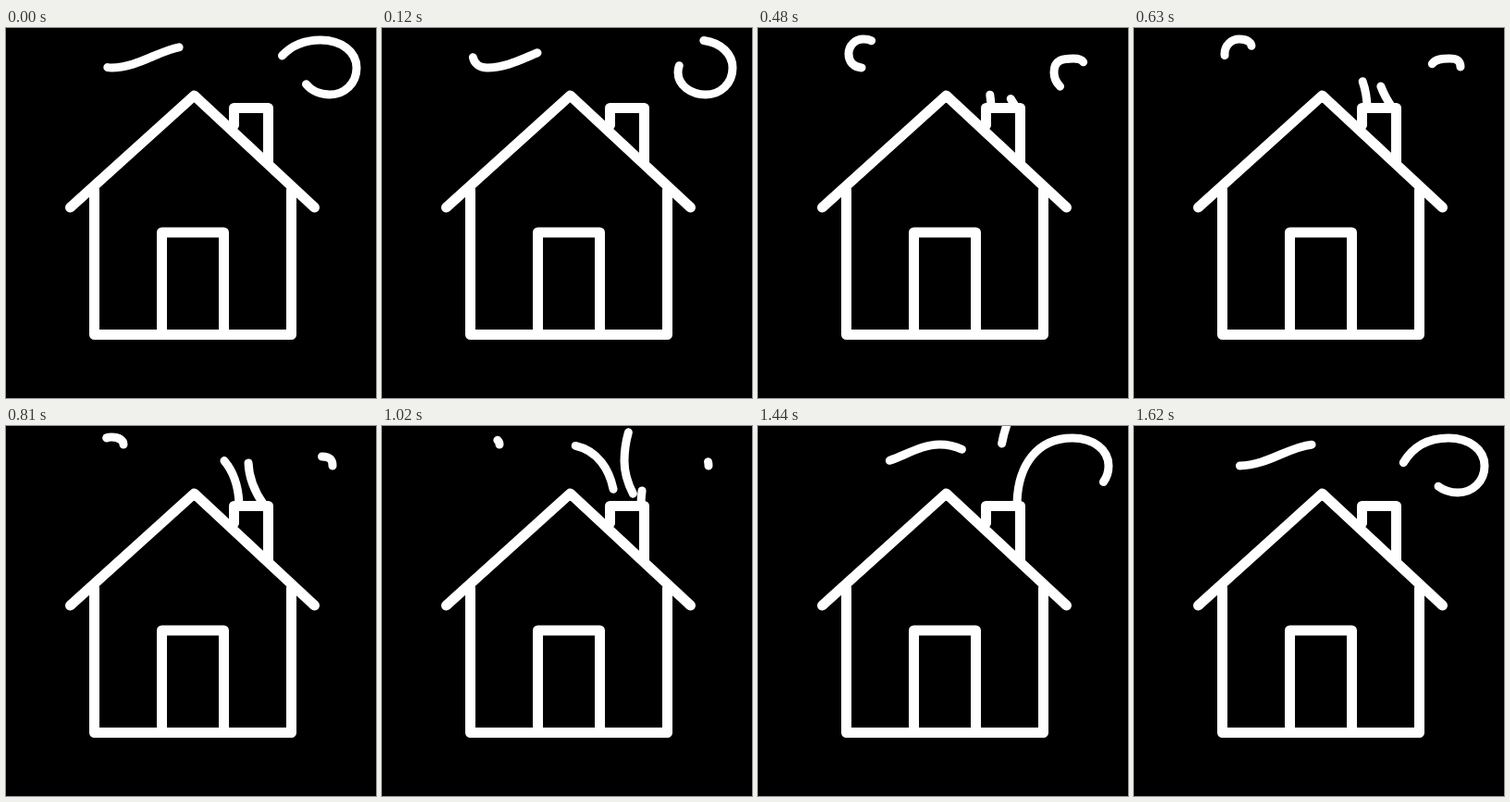
Recreate the animation shown at these times as an HTML page. Size 400 px wide and 400 px high, loop 1.65 s.

```html
<!DOCTYPE html>
<html lang="en">
<head>
<meta charset="utf-8">
<title>House with smoke</title>
<style>
  html, body { margin: 0; width: 100%; height: 100%; overflow: hidden; background: #000; }
  svg { display: block; width: 100%; height: 100%; fill: none; stroke: #fff; stroke-linecap: round; stroke-linejoin: round; }
</style>
</head>
<body>
<svg viewBox="0 0 400 400">
  <path stroke-width="11" d="M69.5 194L203.500 73L333.500 194M95.500 175V331.500H308.500V175M168.500 331V221H235.500V331M246.500 105V86.500H283.500V145"/>
  <g id="smoke" stroke-width="9"></g>
</svg>
<script>
const LOOP = 1650, STEP = 30, LAG = 495;

// Each wisp is a stroke whose tail follows its tip LAG ms later.
const wisps = [
  { start: 150, duration: 2230, x1: 1 / 3, x2: 2 / 3,
    d: 'M252 87C252 58 238 20 196 20C170 20 145 43 114 43C104 43 98 37 98 28S105 12 114 12S127 16 127 20' },
  { start: 190, duration: 2230, x1: 1 / 3, x2: 2 / 3,
    d: 'M280 87C272 76 262 58 262 38C262 20 266 6 272 -10L330 -168' },
  { start: 860, duration: 1570, x1: .28, x2: .23,
    d: 'M280 86C280 45 300 13 340 13C363 13 379 26 379 43S366 72 350 72S320 62 320 48S330 33 341 33S353 38 353 43' }
];

// cubic-bezier(x1, 0, x2, 1)
function ease(x, x1, x2) {
  if (x <= 0) return 0;
  if (x >= 1) return 1;
  let low = 0, high = 1, p;
  for (let i = 0; i < 24; i++) {
    p = (low + high) / 2;
    const q = 1 - p;
    if (3 * x1 * p * q * q + 3 * x2 * p * p * q + p * p * p < x) low = p;
    else high = p;
  }
  return p * p * (3 - 2 * p);
}

// A wisp outlives one loop, so two copies overlap.
const strokes = wisps.flatMap(wisp => [0, LOOP].map(shift => {
  const path = document.createElementNS('http://www.w3.org/2000/svg', 'path');
  path.setAttribute('d', wisp.d);
  document.getElementById('smoke').append(path);
  return { ...wisp, shift, path, length: path.getTotalLength() };
}));

function draw({ start, duration, x1, x2, shift, path, length }, time) {
  const at = t => ease((t - start) / duration, x1, x2);
  const tip = at(time + shift), tail = at(time + shift - LAG);
  path.style.display = tip > 0 && tail < 1 ? '' : 'none';
  path.style.strokeDasharray = `${(tip - tail) * length} 9999`;
  path.style.strokeDashoffset = -tail * length;
}

const begin = performance.now();
function frame() {
  const elapsed = (performance.now() - begin) % LOOP;
  const time = Math.floor(elapsed / STEP) * STEP;
  strokes.forEach(stroke => draw(stroke, time));
  requestAnimationFrame(frame);
}
frame();
</script>
</body>
</html>
```
